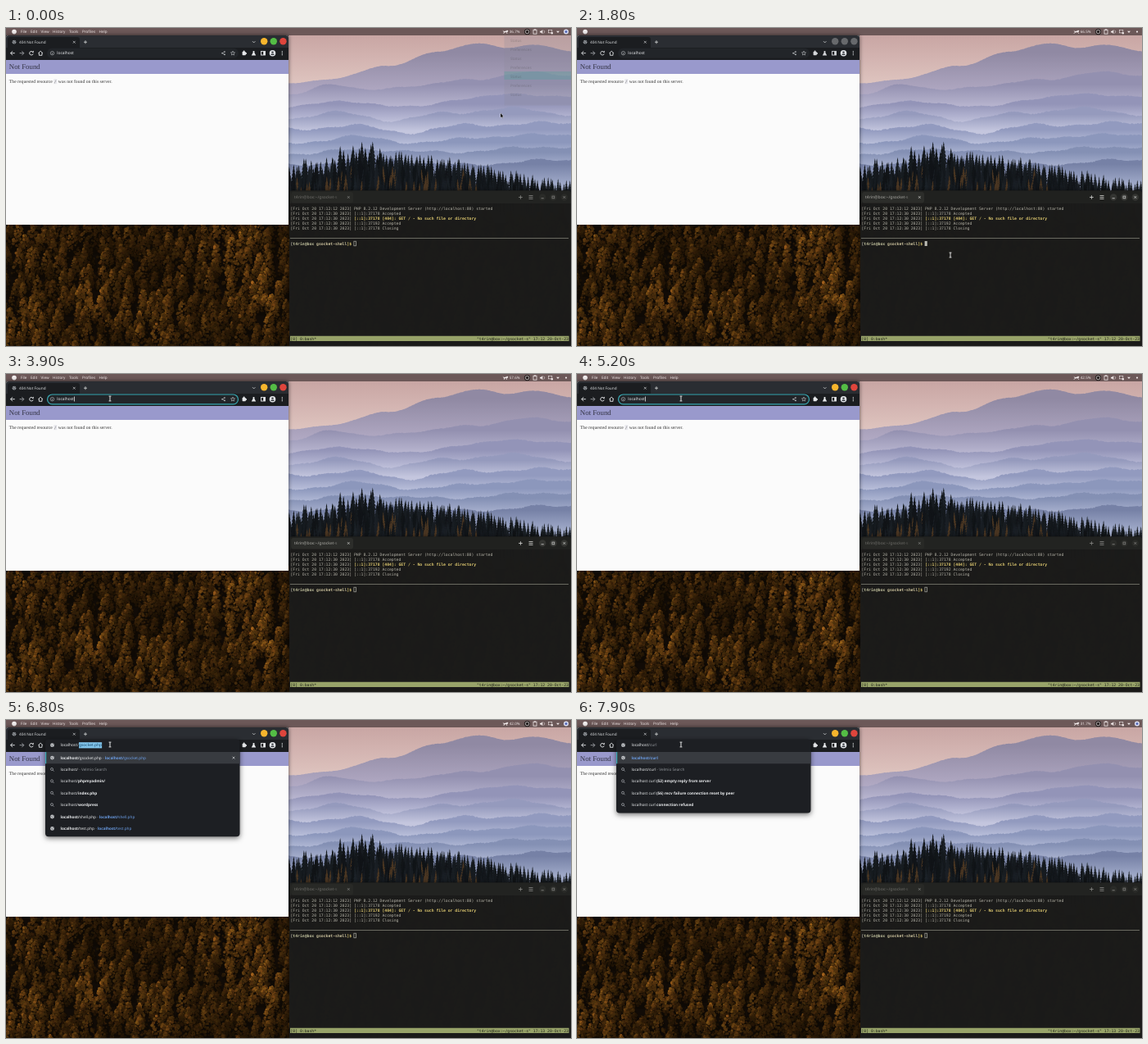
An HTML page with a canvas that plays this animation: 690x388 px, repeating every 8 s.

```html
<!DOCTYPE html>
<html lang="en">
<head>
<meta charset="utf-8">
<title>Desktop session</title>
<style>
  html, body { margin: 0; width: 100%; height: 100%; overflow: hidden; background: #111; }
  canvas { display: block; }
</style>
</head>
<body>
<canvas id="stage" width="690" height="388"></canvas>
<script>
const W = 690, H = 388, LOOP = 8000;
const SANS = '"Noto Sans", sans-serif';
const SERIF = '"Liberation Serif", serif';
const MONO = '"DejaVu Sans Mono", monospace';
const HOST = 't4rin@box';

const stage = document.getElementById('stage').getContext('2d');
const wallpaper = document.createElement('canvas');
wallpaper.width = W;
wallpaper.height = H;
let g = wallpaper.getContext('2d');

let seed = 7;
function random() {
  seed = (seed * 1664525 + 1013904223) >>> 0;
  return seed / 4294967296;
}

// ---------- drawing helpers ----------
function rect(x, y, w, h, color, radius = 0) {
  g.fillStyle = color;
  g.beginPath();
  g.roundRect(x, y, w, h, radius);
  g.fill();
}
function disc(x, y, r, color) {
  g.fillStyle = color;
  g.beginPath();
  g.arc(x, y, r, 0, 7);
  g.fill();
}
function ring(x, y, r, color, width = 0.7, from = 0, to = 7) {
  g.strokeStyle = color;
  g.lineWidth = width;
  g.beginPath();
  g.arc(x, y, r, from, to);
  g.stroke();
}
function line(color, width, ...xy) {
  g.strokeStyle = color;
  g.lineWidth = width;
  g.beginPath();
  for (let i = 0; i < xy.length; i += 2) g.lineTo(xy[i], xy[i + 1]);
  g.stroke();
}
function polygon(color, ...xy) {
  g.fillStyle = color;
  g.beginPath();
  for (let i = 0; i < xy.length; i += 2) g.lineTo(xy[i], xy[i + 1]);
  g.fill();
}
function cross(x, y, r, color, width = 0.7) {
  line(color, width, x - r, y - r, x + r, y + r);
  line(color, width, x - r, y + r, x + r, y - r);
}
function plus(x, y, r, color) {
  line(color, 0.8, x - r, y, x + r, y);
  line(color, 0.8, x, y - r, x, y + r);
}
// Draws [text, color, weight] runs one after another and returns the end x.
function write(x, y, size, family, ...runs) {
  g.textBaseline = 'alphabetic';
  g.textRendering = 'geometricPrecision';
  for (const [text, color, weight = 400] of runs) {
    g.font = `${weight} ${size}px ${family}`;
    g.fillStyle = color;
    g.fillText(text, x, y + size * 0.34);
    x += g.measureText(text).width;
  }
  return x;
}
function curve(...xy) {
  return x => {
    let i = 0;
    while (i < xy.length - 4 && x > xy[i + 2]) i += 2;
    const u = Math.min(1, Math.max(0, (x - xy[i]) / (xy[i + 2] - xy[i])));
    return xy[i + 1] + (xy[i + 3] - xy[i + 1]) * (1 - Math.cos(u * Math.PI)) / 2;
  };
}

// ---------- wallpaper ----------
function ridge(height, top, mist, depth, rough) {
  const phase = random() * 20;
  const fill = g.createLinearGradient(0, height(520), 0, height(520) + depth);
  fill.addColorStop(0, top);
  fill.addColorStop(1, mist);
  g.fillStyle = fill;
  g.beginPath();
  g.moveTo(345, 200);
  for (let x = 345; x <= W; x++) {
    const bumps = Math.sin(x / 17 + phase) + 0.6 * Math.sin(x / 7 + phase * 3) + 0.8 * (random() - 0.5);
    g.lineTo(x, height(x) + bumps * rough);
  }
  g.lineTo(W, 200);
  g.fill();
}
function paintMountains() {
  const sky = g.createLinearGradient(0, 8, 0, 70);
  sky.addColorStop(0, '#c8a5a3');
  sky.addColorStop(1, '#dfc5c0');
  rect(345, 0, 345, 200, sky);
  ridge(curve(345, 67, 400, 62, 465, 46, 530, 29, 577, 18, 612, 24, 650, 21, 690, 28), '#9089a3', '#b1a9c3', 50, 0.6);
  ridge(curve(345, 82, 395, 68, 440, 76, 500, 70, 570, 63, 635, 54, 690, 58), '#9390b0', '#b9b6d0', 28, 1);
  ridge(curve(345, 96, 420, 89, 490, 97, 560, 86, 630, 80, 690, 84), '#9394b8', '#bfc0da', 22, 1.3);
  ridge(curve(345, 110, 400, 103, 470, 112, 540, 104, 610, 98, 690, 105), '#959abd', '#c4c6de', 20, 1.6);
  ridge(curve(345, 124, 420, 119, 490, 127, 570, 118, 690, 116), '#929abf', '#c0c5de', 20, 1.7);
  ridge(curve(345, 140, 430, 133, 510, 140, 590, 132, 690, 130), '#8c97bc', '#bbc2dc', 20, 1.7);
  ridge(curve(345, 153, 450, 148, 530, 152, 620, 147, 690, 144), '#8490b4', '#b2bad6', 22, 1.6);
  ridge(curve(345, 167, 460, 160, 540, 167, 690, 161), '#7681a6', '#9fa9c8', 24, 1.5);

  const treeline = curve(345, 171, 370, 163, 400, 153, 425, 148, 445, 145, 465, 152, 500, 152, 540, 158, 580, 166, 620, 175, 655, 182, 690, 187);
  for (let row = 0; row < 5; row++) {
    for (let x = 343; x < 693; x += 3.6) {
      const near = x < 455;
      const cx = x + random() * 4, size = near ? 1.15 : 0.8;
      const top = treeline(cx) + row * 8 + (near ? random() * 22 - 8 : random() * 7 - 2);
      const color = random() < row * 0.06 ? '#4a3622' : `hsl(210 17% ${7 + random() * 6}%)`;
      const tree = [cx, top];
      for (let k = 1; k < 7; k++) tree.push(cx + k * 0.7 * size, top + k * 4 * size, cx + k * 0.4 * size, top + k * 4 * size);
      tree.push(cx + 3, 202, cx - 3, 202);
      for (let k = 6; k > 0; k--) tree.push(cx - k * 0.4 * size, top + k * 4 * size, cx - k * 0.7 * size, top + k * 4 * size);
      polygon(color, ...tree);
    }
  }
}
function paintForest() {
  rect(0, 238, W, 150, '#110b06');
  const sunny = [[275, 272, 55], [180, 355, 36], [30, 365, 45], [320, 335, 38], [25, 255, 30], [105, 335, 30]];
  for (let y = 246; y < 420; y += 10) {
    for (let x = -8; x < W + 10; x += 17) {
      const cx = x + random() * 15, base = y + random() * 12;
      const height = 23 + random() * 13, width = 14 + random() * 8;
      let glow = 0.2 + random() * 0.5;
      for (const [sx, sy, r] of sunny) glow += 0.45 * Math.exp(-((cx - sx) ** 2 + (base - 14 - sy) ** 2) / (r * r));
      polygon('rgba(14,9,5,.85)', cx, base - height, cx + width * 0.65, base + 3, cx - width * 0.5, base + 3);
      for (let k = 0; k < 70; k++) {
        const down = (k + random() * 8) / 78, side = random() * 2 - 1;
        const light = 4 + 21 * glow * (0.55 + random() * 0.6) * (1 - side * 0.35) * (1.2 - down);
        const reach = width / 2 * Math.pow(down, 0.6);
        disc(cx + side * reach, base - height + down * height, 0.7 + random() * 1.3,
          `hsl(${29 + random() * 6} 70% ${light}%)`);
      }
    }
  }
}
paintMountains();
paintForest();
g = stage;

// ---------- timeline ----------
const FOCUS_TERMINAL = 900, FOCUS_BROWSER = 3500, NEXT_MINUTE = 6000, SLASH_TYPED = 6700;
const typed = [[7000, 'c'], [7200, 'cu'], [7400, 'cur'], [7600, 'curl']];
const load = [[0, '36.7%'], [1000, '66.5%'], [2200, '43.5%'], [3400, '57.6%'], [5200, '42.5%'], [6700, '42.0%'], [7500, '31.7%']];
const mouseX = curve(0, 604, 900, 456, 1900, 456, 2700, 191, 3300, 127);
const mouseY = curve(0, 106, 900, 277, 1900, 277, 2700, 74, 3300, 30);
const valueAt = (steps, t) => steps.reduce((last, [start, value]) => t >= start ? value : last, '');

// ---------- menu bar ----------
function menuBar(t) {
  const white = '#eee6e6';
  rect(0, 0, W, 9, '#6c5858');
  disc(10, 4.6, 2.8, '#f2eeee');
  if (t < FOCUS_TERMINAL + 100 || t >= FOCUS_BROWSER + 200) {
    const items = { File: 18, Edit: 30, View: 42.5, History: 57, Tools: 77, Profiles: 93, Help: 113.5 };
    for (const name in items) write(items[name], 4.6, 4.6, SANS, [name, white]);
  }
  const stride = Math.sin(t / 60);
  polygon(white, 606.5, 2.6, 608, 4, 611, 3.4, 612, 2.4, 613.4, 3.6, 612.4, 5, 608, 5.4);
  line(white, 0.7, 608.5, 5, 607.6 + stride, 7);
  line(white, 0.7, 611.5, 5, 612 - stride, 7);
  write(614.8, 4.6, 4.5, SANS, [valueAt(load, t), white]);
  disc(636.5, 4.6, 3.6, '#241e1e');
  ring(636.5, 4.6, 2.2, '#d8d0d0', 0.8);
  g.strokeStyle = white;
  g.lineWidth = 0.8;
  g.strokeRect(644, 2.2, 4, 5);
  rect(645, 1.4, 2, 1.4, white);
  polygon(white, 652, 3.8, 653.5, 3.8, 655.3, 2, 655.3, 7.2, 653.5, 5.6, 652, 5.6);
  ring(655.2, 4.6, 2.4, white, 0.6, -0.9, 0.9);
  g.strokeRect(662.4, 2.3, 4.4, 3.6);
  disc(666.8, 6.2, 1.2, white);
  polygon(white, 672, 3.7, 676, 3.7, 674, 6);
  if (t < FOCUS_TERMINAL || t >= NEXT_MINUTE) {
    disc(684, 4.6, 3, '#d9dcef');
    disc(684, 4.6, 1.5, '#5468b8');
  } else disc(684, 4.6, 1.1, white);
}

// ---------- browser ----------
function globe(x, y, color = '#c6c9cc') {
  disc(x, y, 2.4, color);
  line('#2b2d31', 0.5, x - 1.8, y - 0.8, x, y + 0.3, x + 0.5, y + 1.8);
  line('#2b2d31', 0.5, x + 0.3, y - 1.8, x + 1.8, y - 0.4);
}
function magnifier(x, y) {
  ring(x - 0.5, y - 0.5, 1.5, '#a9adb2', 0.7);
  line('#a9adb2', 0.7, x + 0.6, y + 0.6, x + 2.1, y + 2.1);
}
function star(x, y, r, color) {
  const points = [];
  for (let i = 0; i <= 10; i++) {
    const a = i * Math.PI / 5 - Math.PI / 2, q = i % 2 ? r * 0.45 : r;
    points.push(x + q * Math.cos(a), y + q * Math.sin(a));
  }
  line(color, 0.6, ...points);
}
function browserChrome(focused) {
  const icon = focused ? '#e6e8ea' : '#d4d6d9';
  rect(0, 9, 345, 16, '#2a2d32', [3, 3, 0, 0]);
  rect(2, 11, 88, 14, '#1b1d20', [3, 3, 0, 0]);
  rect(0, 24, 345, 15, '#1b1d20');
  globe(10, 17.2, '#8b8f94');
  write(16, 17.2, 4.7, SANS, ['404 Not Found', '#dcdee0']);
  cross(83.3, 17.2, 1.4, '#d5d7d9');
  plus(97, 17.2, 2, '#d5d7d9');
  line('#d5d7d9', 0.8, 301, 16.2, 302.7, 17.9, 304.4, 16.2);
  const colors = focused ? ['#f7b52d', '#54bd45', '#df453c'] : ['#67696c', '#67696c', '#67696c'];
  colors.forEach((color, i) => disc(315.2 + i * 11.6, 16.2, 4.2, color));

  line(icon, 0.9, 8, 28.2, 5.6, 30.7, 8, 33.2);
  line(icon, 0.9, 5.6, 30.7, 10.8, 30.7);
  line('#a0a3a7', 0.9, 19.4, 28.2, 21.8, 30.7, 19.4, 33.2);
  line('#a0a3a7', 0.9, 16.6, 30.7, 21.8, 30.7);
  ring(31, 30.7, 2.3, icon, 0.9, 0.3, 5.4);
  polygon(icon, 31.4, 29.9, 33.7, 29.9, 33.7, 27.6);
  line(icon, 0.9, 39.4, 30.8, 42.2, 28.2, 45, 30.8);
  line(icon, 0.9, 40.4, 30.2, 40.4, 33.3, 44, 33.3, 44, 30.2);
  rect(288.6, 29, 4.2, 4.2, icon, 0.6);
  disc(290.6, 28.7, 1.1, icon);
  disc(293, 31, 1.1, icon);
  polygon(icon, 301.6, 28, 303.4, 28, 303.4, 30, 305.2, 33.4, 299.8, 33.4, 301.6, 30);
  g.strokeStyle = icon;
  g.lineWidth = 0.9;
  g.strokeRect(311.5, 28.4, 5, 4.6);
  rect(314.2, 28.4, 2.3, 4.6, icon);
  disc(325.5, 30.7, 3.8, '#e3e6ea');
  disc(325.5, 29.6, 1.2, '#35383d');
  rect(323.4, 31.4, 4.2, 1.6, '#35383d', 0.8);
  for (let i = -1; i < 2; i++) disc(337.3, 30.7 + i * 2, 0.65, icon);
}
function addressBar(t) {
  const active = t >= FOCUS_BROWSER;
  rect(50, 24.8, 234, 12, '#222529', 6);
  if (active) {
    g.strokeStyle = '#38a9b3';
    g.lineWidth = 1.2;
    g.beginPath();
    g.roundRect(50.5, 25, 233, 11.8, 5.9);
    g.stroke();
  }
  ring(56.5, 30.7, 2.2, '#c3c6c9', 0.6);
  line('#c3c6c9', 0.6, 56.5, 30.2, 56.5, 32);
  const end = write(62.2, 30.7, 4.9, SANS, ['localhost', '#e8eaed']);
  if (active && Math.floor((t - 3600) / 600) % 2 === 0) rect(end + 0.3, 27.6, 0.7, 6, '#fff');
  line('#c3c6c9', 0.6, 267, 29, 264, 30.7, 267, 32.4);
  for (const [x, y] of [[267, 29], [264, 30.7], [267, 32.4]]) disc(x, y, 0.8, '#c3c6c9');
  star(277, 30.8, 2.7, '#c3c6c9');
}
const WHITE = '#eceef0', GREY = '#92969b', BLUE = '#6c9fe8';
const SEARCH = [' - Velmio Search', GREY];
const localPage = page => ['globe', ['localhost/', WHITE, 700], [page, WHITE], [' - ', GREY], ['localhost/', BLUE, 700], [page, BLUE]];
const localGuess = page => ['find', ['localhost/', WHITE], [page, WHITE, 700]];
const phrase = rest => ['find', ['localhost curl ', WHITE], [rest, WHITE, 700]];

function suggestions(word) {
  if (!word) return [
    localPage('gsocket.php'), ['find', ['localhost/', WHITE], SEARCH],
    localGuess('phpmyadmin/'), localGuess('index.php'), localGuess('wordpress'),
    localPage('shell.php'), localPage('test.php')
  ];
  return [
    ['globe', ['localhost/' + word, BLUE, 700]], ['find', ['localhost/' + word, WHITE], SEARCH],
    phrase('(52) empty reply from server'), phrase('(56) recv failure connection reset by peer'),
    phrase('connection refused')
  ];
}
function dropdown(t) {
  const word = valueAt(typed, t), rows = suggestions(word);
  g.save();
  g.shadowColor = 'rgba(0,0,0,.55)';
  g.shadowBlur = 6;
  g.shadowOffsetY = 2;
  rect(48, 23.5, 237.5, 18 + rows.length * 14.4, '#1d1f23', 4);
  g.restore();
  rect(48, 39, 237.5, 14.3, '#383b40');
  rect(48, 39, 1.2, 14.3, '#38a9b3');
  globe(56.5, 30.7);
  const end = write(66.5, 30.7, 4.9, SANS, ['localhost', WHITE], ['/' + word, GREY]);
  if (!word) {
    const stop = write(end, 30.7, 4.9, SANS, ['gsocket.php', '#10202c']);
    rect(end, 27.2, stop - end, 7.2, '#83c6ec');
    write(end, 30.7, 4.9, SANS, ['gsocket.php', '#17486a']);
    cross(278, 46.1, 1.4, '#d5d7d9');
  }
  rows.forEach(([kind, ...runs], i) => {
    const y = 46.1 + i * 14.38;
    (kind === 'globe' ? globe : magnifier)(56.5, y);
    write(66.5, y, 4.7, SANS, ...runs);
  });
}
function browser(t) {
  g.save();
  g.shadowColor = 'rgba(0,0,0,.6)';
  g.shadowBlur = 5;
  rect(0, 9, 345, 231, '#fbfbfb', [3, 3, 0, 0]);
  g.restore();
  rect(0, 39, 345, 17, '#9999cc');
  write(3.8, 47.4, 8.8, SERIF, ['Not Found', '#333344']);
  const x = write(3.8, 65.2, 5.72, SERIF, ['The requested resource ', '#333']);
  rect(x, 62.3, 4, 6, '#e9e9ee');
  write(x + 0.4, 65.2, 5, MONO, ['/', '#777']);
  write(x + 5.6, 65.2, 5.72, SERIF, ['was not found on this server.', '#333']);
  browserChrome(t < FOCUS_TERMINAL || t >= FOCUS_BROWSER);
  if (t < SLASH_TYPED) addressBar(t);
  else dropdown(t);
}

// ---------- terminal ----------
function terminal(t) {
  const focused = t >= FOCUS_TERMINAL && t < FOCUS_BROWSER;
  const bright = t >= FOCUS_TERMINAL && t < 4200;
  const header = bright ? '#d8d8d6' : '#8b8b88', text = '#b5b3a8', yellow = '#e0ca70';
  g.save();
  g.shadowColor = 'rgba(0,0,0,.6)';
  g.shadowBlur = 5;
  rect(346, 198.5, 344, 189.5, 'rgba(28,28,27,.95)', [4, 4, 0, 0]);
  g.restore();
  rect(346, 198.5, 344, 15.5, bright ? '#20211f' : '#222321', [4, 4, 0, 0]);
  rect(348, 200, 76, 13.5, bright ? '#2c2d2a' : '#282926', 3);
  const fade = g.createLinearGradient(352, 0, 412, 0);
  fade.addColorStop(0, bright ? '#aaa9a4' : '#6c6b67');
  fade.addColorStop(0.75, bright ? '#aaa9a4' : '#6c6b67');
  fade.addColorStop(1, '#33332f');
  write(352, 206.6, 5, SANS, [HOST + ':~/gsocket-s', fade]);
  cross(418.3, 206.5, 1.3, header);
  plus(628.4, 206.5, 2.3, header);
  for (let i = -1; i < 2; i++) line(header, 0.8, 638.5, 206.5 + i * 2, 643.5, 206.5 + i * 2);
  for (const x of [655.2, 668.4, 681.8]) disc(x, 206.5, 4.2, bright ? '#343532' : '#2a2b28');
  line(header, 0.8, 653.6, 207.8, 656.8, 207.8);
  g.strokeStyle = header;
  g.lineWidth = 0.7;
  g.strokeRect(667, 205.1, 2.8, 2.8);
  cross(681.8, 206.5, 1.4, header);

  const mono = (x, y, ...runs) => write(x, y, 4.77, MONO, ...runs);
  const log = (row, time, ...message) =>
    mono(347.5, 220 + row * 6.2, [`[Fri Oct 20 17:12:${time} 2023] `, text], message);
  log(0, '12', 'PHP 8.2.12 Development Server (http://localhost:80) started', text);
  log(1, '30', '[::1]:37178 Accepted', text);
  log(2, '30', '[::1]:37178 [404]: GET / - No such file or directory', yellow, 700);
  log(3, '30', '[::1]:37192 Accepted', text);
  log(4, '30', '[::1]:37178 Closing', text);
  rect(347, 256.3, 340, 0.6, '#85857a');
  mono(347.5, 263, ['[', text, 700], [HOST, '#c5c5a0', 700], [' gsocket-shell', '#d0c6a0', 700], [']$', yellow, 700]);
  if (focused) rect(424.6, 260, 3.1, 6, '#bdbdb5');
  else {
    g.strokeStyle = '#b0b0a8';
    g.lineWidth = 0.7;
    g.strokeRect(424.9, 260.2, 2.7, 5.6);
  }
  rect(347, 375.8, 340.5, 6.3, '#98a369');
  mono(347.5, 379, ['[0] 0:bash*', '#20231a']);
  mono(575, 379, [`"${HOST}:~/gsocket-s" 17:${t < NEXT_MINUTE ? 12 : 13} 20-Oct-23`, '#20231a']);
}

// ---------- overlays ----------
function closingMenu(t) {
  if (t >= 300) return;
  g.save();
  g.globalAlpha = 0.25 * (1 - t / 300);
  rect(608.5, 9.5, 81.5, 85, '#8d8797');
  rect(608.5, 53, 81.5, 10, '#35a58f');
  for (let i = 0; i < 7; i++) write(616, 15 + i * 11, 4.6, SANS, [i % 2 ? 'Preferences' : 'Status', '#333']);
  g.restore();
}
function pointer(t) {
  const x = mouseX(t), y = mouseY(t);
  const overText = (y > 215 && x > 346) || (y > 25 && y < 37 && x > 60 && x < 260);
  if (overText) {
    const color = '#f8f8f8';
    line(color, 0.9, x, y - 2.7, x, y + 2.7);
    line(color, 0.9, x - 1.4, y - 2.9, x + 1.4, y - 2.9);
    line(color, 0.9, x - 1.4, y + 2.9, x + 1.4, y + 2.9);
  } else {
    const shape = [x, y - 2, x, y + 3.2, x + 1.2, y + 2.1, x + 2, y + 3.8, x + 2.8, y + 3.4, x + 2.1, y + 1.8, x + 3.6, y + 1.7, x, y - 2];
    line('#fff', 0.6, ...shape);
    polygon('#111', ...shape);
  }
}

function draw(now) {
  const t = now % LOOP;
  g.drawImage(wallpaper, 0, 0);
  menuBar(t);
  terminal(t);
  browser(t);
  closingMenu(t);
  pointer(t);
}
const start = performance.now();
function frame() {
  draw(performance.now() - start);
  requestAnimationFrame(frame);
}
frame();
</script>
</body>
</html>
```
